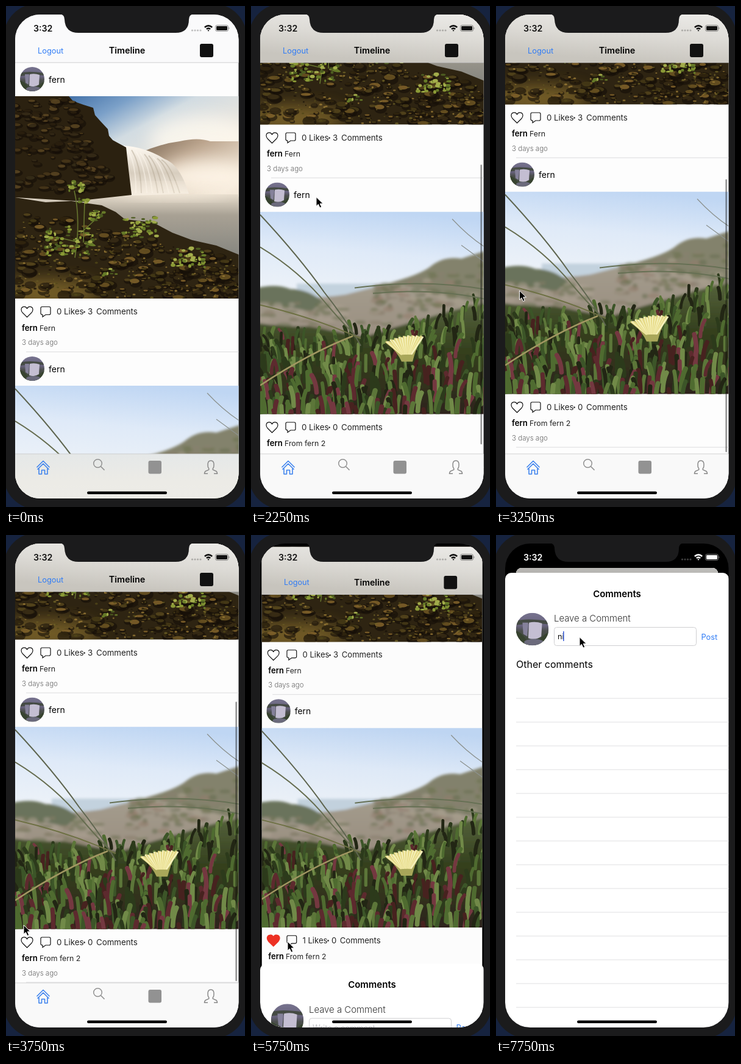
An HTML page for the animation above (8000 ms loop, 392x822 px).

```html
<!DOCTYPE html>
<html lang="en">
<head>
<meta charset="utf-8">
<title>Photo timeline</title>
<style>
  html, body { margin: 0; width: 100%; height: 100%; overflow: hidden; background: #16233f; }
  #stage { display: block; width: 392px; height: 822px; }
  text { font-family: Inter, Roboto, sans-serif; white-space: pre; }
</style>
</head>
<body>
<svg id="stage" viewBox="0 0 392 822"></svg>
<script>
const LOOP = 8000, STEP = 250, USER = 'fern';
const SCREEN = { x: 15, y: 14, w: 367, h: 794 };
const BLUE = '#2f7cf6';

let seed = 7;
const rand = (a = 0, b = 1) => {
  seed = (seed * 16807) % 2147483647;
  return a + (b - a) * seed / 2147483647;
};
const pick = list => list[Math.floor(rand(0, list.length))];
const repeat = (n, draw) => Array.from({ length: n }, (_, i) => draw(i)).join('');

// Markup helpers
const rect = (x, y, w, h, fill, more = '') =>
  `<rect x="${x}" y="${y}" width="${w}" height="${h}" fill="${fill}" ${more}/>`;
const shape = (d, fill, more = '') => `<path d="${d}" fill="${fill}" ${more}/>`;
const line = (d, stroke, width = 1, more = '') =>
  `<path d="${d}" fill="none" stroke="${stroke}" stroke-width="${width}" ${more}/>`;
const label = (x, y, str, size, more = '') => `<text x="${x}" y="${y}" font-size="${size}" ${more}>${str}</text>`;
const gradient = (id, stops, more = 'x2="0" y2="1"') =>
  `<linearGradient id="${id}" ${more}>${stops.map(([at, color]) =>
    `<stop offset="${at}" stop-color="${color}"/>`).join('')}</linearGradient>`;
const blur = (id, amount) =>
  `<filter id="${id}" x="-50%" y="-50%" width="200%" height="200%"><feGaussianBlur stdDeviation="${amount}"/></filter>`;
const blob = (x, y, rx, ry, fill, more = '') =>
  `<ellipse cx="${x.toFixed(1)}" cy="${y.toFixed(1)}" rx="${rx.toFixed(1)}" ry="${ry.toFixed(1)}" fill="${fill}" ${more}/>`;

const defs = `<defs>
  ${gradient('dusk', [[0, '#4674aa'], [.25, '#7ba0c8'], [.5, '#d2dce2'], [1, '#f3e9dc']], 'x1=".25" y1="0" x2=".55" y2=".5"')}
  ${gradient('hill', [[0, '#806d59'], [.45, '#bba48d'], [1, '#f0e4d4']], 'x2="1" y2=".7"')}
  ${gradient('fall', [[0, '#fffaf2'], [.55, '#d8cebf'], [1, '#f6eee2']])}
  ${gradient('lake', [[0, '#e6dccc'], [.2, '#a8a194'], [.6, '#85857f'], [1, '#60625e']])}
  ${gradient('day', [[0, '#bfd6f3'], [.4, '#dfeaf8'], [1, '#f2f5f8']], 'x1=".6" y1="0" x2=".4" y2="1"')}
  ${gradient('sand', [[0, '#a9a494'], [1, '#95877a']])}
  ${gradient('leaves', [[0, '#56633c'], [.4, '#35411f'], [1, '#2c211b']])}
  ${gradient('headTint', [[0, '#ecebe8'], [.5, '#dddbd6'], [1, '#c8c5be']], 'x1="1" y1="0" x2=".7" y2="1"')}
  ${gradient('tabTint', [[0, '#e5e8e8'], [.4, '#ecebe6'], [1, '#edece8']])}
  ${gradient('face', [[0, '#77738f'], [.4, '#66617b'], [.55, '#4b4e4c'], [1, '#354330']])}
  ${blur('mist', 14)}${blur('soft', 2)}
  <clipPath id="screenClip"><rect x="15" y="14" width="366.5" height="794" rx="41"/></clipPath>
  <clipPath id="cardClip"><rect id="cardShape" x="15" y="14" width="367" height="830"/></clipPath>
  <clipPath id="round"><circle r="20"/></clipPath>
  <g id="avatar"><g clip-path="url(#round)">
    ${rect(-20, -20, 40, 40, 'url(#face)')}
    ${shape('M-20-10 Q-8-14 20-10 L20-6 Q4-8-20-5Z', '#454b44')}
    ${shape('M-4-8 Q4-10 12-7 L11 9 Q4 14-5 11Z', '#c4bed2')}
    ${shape('M-12-8 L-5-8-6 9-11 6Z', '#85819a')}
    ${shape('M-20 2 Q-8 6-6 20 H-20Z M20 4 Q10 8 6 20 H20Z', '#37432f')}
    ${blob(2, 16, 12, 4, '#6b6a7c')}
  </g></g>
  <path id="heart" d="M0 9 L-7.3 1.8 Q-9.5-.6-9.5-3.5 A4.9 4.9 0 0 1 0-4.9 A4.9 4.9 0 0 1 9.5-3.5 Q9.5-.6 7.3 1.8Z" stroke-linejoin="round"/>
</defs>`;

const photoSvg = (y, content) =>
  `<svg x="15" y="${y}" width="367" height="332" viewBox="0 0 367 332" overflow="hidden">${content}</svg>`;

function waterfallPhoto(y) {
  const cliff = 'M0 0 H88 L95 8 112 14 128 19 131 31 139 40 152 54 154 65 160 72 182 84 186 120 191 162 100 172 0 166Z';
  const shore = 'M0 166 L50 174 92 172 142 179 165 190 180 202 226 207 258 224 290 236 330 245 367 260 V332 H0Z';
  const rock = (x, yy, tops, size) => {
    const rx = rand(3, 11) * size, ry = rx * rand(.45, .75);
    return blob(x, yy, rx, ry, '#140e07', 'opacity=".6"') +
      blob(x - rx * .15, yy - ry * .4, rx * .75, ry * .5, pick(tops), 'opacity=".8"');
  };
  const plant = (cx, cy, spread, n) => repeat(n, () =>
    blob(cx + rand(-spread, spread), cy + rand(-spread, spread) * .6, rand(1.5, 4.5), rand(1, 3), pick(['#8b9a36', '#667a28', '#a3ad4b', '#4c5b20'])));
  return photoSvg(y, `
    ${rect(0, 0, 367, 332, 'url(#dusk)')}
    ${blob(305, 72, 85, 40, '#fffaf0', 'opacity=".75" filter="url(#mist)"')}
    ${shape('M205 93 Q238 78 270 74 Q300 67 320 74 L367 74 V165 H210Z', 'url(#hill)')}
    ${blob(310, 132, 75, 28, '#fff6e8', 'opacity=".9" filter="url(#mist)"')}
    ${rect(0, 161, 367, 171, 'url(#lake)')}
    ${shape('M178 81 Q215 84 245 103 Q270 112 285 160 L190 163Z', 'url(#fall)')}
    ${repeat(9, i => line(`M${184 + i * 7} ${86 + i * 2.3} Q${199 + i * 7} 112 ${198 + i * 9} 159`, pick(['#fffaf0', '#b6a995']), 2, 'opacity=".5"'))}
    ${blob(265, 157, 90, 9, '#f9efe0', 'opacity=".8" filter="url(#mist)"')}
    ${shape(cliff, '#2b2110')}
    ${repeat(150, () => { const yy = rand(5, 157); return rock(rand(0, 90 + yy * .52), yy, ['#4e3b1b', '#2c2110', '#604a24', '#3a2f19'], 1); })}
    ${shape(shore, '#2e2412')}
    ${blob(50, 322, 90, 22, '#8a702e', 'opacity=".8" filter="url(#mist)"')}
    ${repeat(230, () => { const x = rand(0, 367), top = 186 + x * .22;
      return rock(x, rand(top, 332), ['#5a4a1e', '#3a2d16', '#745a25', '#4a3e18', '#33270f', '#8a6a2e'], 1.15); })}
    ${repeat(260, () => { const x = rand(0, 367);
      return blob(x, rand(195 + x * .2, 332), rand(1, 3), rand(.6, 1.8), pick(['#9a7b36', '#6e6226', '#1a1209', '#504718']), 'opacity=".8"'); })}
    ${line('M98 265 Q108 205 97 155 M112 240 L114 172 M105 240 L72 232 M107 225 L145 190', '#66752f', 1.6)}
    ${plant(100, 148, 13, 26)}${plant(113, 170, 8, 10)}${plant(88, 238, 40, 75)}${plant(137, 195, 14, 20)}
    ${plant(205, 215, 27, 55)}${plant(285, 265, 27, 40)}${plant(155, 290, 12, 8)}`);
}

function dunePhoto(y) {
  const COUNT = 420;
  const leaf = i => {
    const depth = i / COUNT, x = rand(-5, 372);
    const far = 205 - Math.max(0, x - 190) * .3;
    const base = far + depth * (355 - far) + rand(-6, 6);
    const h = rand(12, 24) + depth * 14, lean = rand(-7, 7) + (x - 180) * .015;
    const red = rand() < .12 + depth * .3 - x * .0004;
    const color = red ? pick(['#5d2a2e', '#743840', '#47221f'])
      : pick(['#4f6b30', '#3c5528', '#718a48', '#5c7639', '#2c3a1b', '#222614']);
    return line(`M${x.toFixed(1)} ${base.toFixed(1)} q${(lean * .1).toFixed(1)} ${(-h * .6).toFixed(1)} ${lean.toFixed(1)} ${(-h).toFixed(1)}`,
      color, (rand(3.5, 6) + depth * 3).toFixed(1), 'stroke-linecap="round"');
  };
  return photoSvg(y, `
    ${rect(0, 0, 367, 170, 'url(#day)')}
    <g filter="url(#soft)">
      ${rect(60, 118, 190, 30, '#c3d2de')}
      ${shape('M-9 139 Q80 145 140 136 L225 114 Q300 97 376 75 V250 H-9Z', 'url(#sand)')}
      ${shape('M-9 126 Q25 117 50 127 Q80 127 103 148 L83 164 Q35 151-9 154Z', '#6b735c')}
      ${shape('M212 117 Q260 104 278 91 Q300 72 330 77 L376 62 V156 Q300 132 212 117Z', '#83826c')}
      ${repeat(100, () => { const x = rand(190, 372); return blob(x, rand(168 - x * .24, 172), rand(4, 11), rand(2, 5), pick(['#6c714f', '#a89f8c', '#8b8070', '#676e50', '#937d6c']), 'opacity=".6"'); })}
      ${repeat(45, () => blob(rand(0, 210), rand(148, 190), rand(5, 14), rand(2, 5), pick(['#6a7150', '#aba191', '#877c68']), 'opacity=".55"'))}
      ${shape('M-9 182 Q45 190 80 188 Q130 197 170 206 Q210 192 275 174 Q330 157 376 148 V342 H-9Z', 'url(#leaves)')}
    </g>
    ${repeat(COUNT, leaf)}
    ${line('M0 5 Q65 75 105 132 Q143 180 165 220', '#5e654f', 2)}
    ${line('M0 58 Q66 98 110 153 Q133 180 152 199', '#666d50', 2)}
    ${line('M0 153 Q90 174 165 208', '#6d7043', 2)}
    ${line('M0 285 Q80 232 152 204', '#a29762', 2.5)}
    ${line('M155 125 Q265 110 367 127 M185 134 Q285 125 367 143', '#667054', 2)}
    ${line('M315 12 Q340 39 367 57 M330 55 L367 82', '#8d9390', 1.3)}
    ${shape('M207 214 Q225 230 232 246 L250 246 Q255 225 266 205Z', '#a9a75a')}
    ${repeat(26, i => { const k = i / 25;
      return line(`M${(232 + 16 * k).toFixed(1)} 234 L${(206 + 61 * k).toFixed(1)} ${(213 - 9 * k - 5 * Math.sin(Math.PI * k) + i % 3).toFixed(1)}`, i % 2 ? '#f6f1bb' : '#e6da86', 3); })}`);
}

function post(top, photo, caption, id) {
  return `<use href="#avatar" x="43" y="${top + 27}"/>
    ${label(70, top + 32.5, USER, 14)}
    ${photo(top + 55)}
    <g transform="translate(34.5 ${top + 408.5})"><use id="heart${id}" href="#heart" fill="#fff" stroke="#111" stroke-width="1.2"/></g>
    ${line(`M59 ${top + 400.5} H71 Q73 ${top + 400.5} 73 ${top + 403} V${top + 411} Q73 ${top + 413.5} 71 ${top + 413.5} H65 L60 ${top + 417} V${top + 413.5} Q57 ${top + 413.5} 57 ${top + 411} V${top + 403} Q57 ${top + 400.5} 59 ${top + 400.5}Z`, '#111', 1.2)}
    <g font-size="13.3" fill="#222">
      <text id="likes${id}" x="83" y="${top + 413}">0</text>
      <g id="counts${id}"><text x="95" y="${top + 413}">Likes</text>
        <circle cx="128.5" cy="${top + 409}" r="1.3"/>
        <text x="134" y="${top + 413}">${id === 1 ? 3 : 0}</text>
        <text x="148" y="${top + 413}">Comments</text></g>
    </g>
    ${label(26, top + 439.5, USER, 13.1, 'font-weight="600"')}
    ${label(55, top + 439.5, caption, 12.3, 'fill="#222"')}
    ${label(26, top + 463, '3 days ago', 11.5, 'fill="#666" font-weight="300"')}
    ${rect(33, top + 474, 349, 1, '#dcdcde')}`;
}

const header = `${rect(15, 14, 367, 79, '#fafafb')}
  <g id="headTintLayer">${rect(15, 14, 367, 79, 'url(#headTint)')}</g>
  ${rect(15, 92.5, 367, .8, '#c4c4c6')}
  ${label(52, 77.5, 'Logout', 12.8, `fill="${BLUE}"`)}
  ${label(198.5, 78, 'Timeline', 14.4, 'font-weight="600" text-anchor="middle"')}
  ${rect(318, 62, 22, 22, '#111', 'rx="3"')}`;

const tabs = `${rect(15, 735, 367, 110, '#f9f9f9')}
  <g id="tabTintLayer">${rect(15, 735, 367, 110, 'url(#tabTint)')}</g>
  ${rect(15, 734.5, 367, .8, '#c7c7c8')}
  ${line('M50.5 757 L61 746.5 71.5 757 M51.5 760.5 L61 751 70.5 760.5 M54 759 V768 H58.5 V761.5 H63.5 V768 H68 V759', '#3e83ee', 1.6, 'stroke-linejoin="round"')}
  <circle cx="150.5" cy="750.5" r="6.8" fill="none" stroke="#929292" stroke-width="1.5"/>
  ${line('M155.5 755.5 L161.5 761.5', '#929292', 1.7)}
  ${rect(233.5, 746, 21.5, 21.5, '#929292', 'rx="3"')}
  ${line('M331 767.3 H325.5 Q325.5 763.5 329 762.5 L332.5 761 Q333.5 759.5 331.5 757 Q329.5 746 336 746 Q342.5 746 340.5 757 Q338.5 759.5 339.5 761 L343 762.5 Q346.5 763.5 346.5 767.3 H341', '#8a8a8a', 1.5)}`;

const sheet = `${rect(15, 62, 367, 790, '#fff', 'rx="10"')}
  ${label(198.5, 101.5, 'Comments', 15, 'font-weight="600" text-anchor="middle"')}
  <use href="#avatar" transform="translate(59.5 154.5) scale(1.34)"/>
  ${label(95, 142, 'Leave a Comment', 14.9, 'font-weight="300" fill="#333"')}
  ${rect(95.5, 151.5, 233, 30, '#fff', 'rx="4" stroke="#cfcfd1"')}
  <text id="field" x="101" y="171" font-size="12.8"></text>
  <rect id="caret" y="158" width="1.6" height="16" fill="#3f62d8"/>
  ${label(336.5, 171.5, 'Post', 12.8, `fill="${BLUE}"`)}
  ${label(33, 217.5, 'Other comments', 16)}
  ${repeat(14, i => rect(33, 267.5 + i * 39, 349, 1, '#dfdfe1'))}`;

const statusBar = `<g id="status">
  ${label(45, 41.5, '3:32', 14.2, 'font-weight="600"')}
  ${repeat(4, i => `<circle cx="${305.5 + i * 4.5}" cy="40" r="1.6" opacity=".25"/>`)}
  <path d="M325 34 Q332 28 339 34 L337.3 36 Q332 31.6 326.7 36Z M328 37 Q332 33.7 336 37 L334.4 38.8 Q332 37 329.6 38.8Z M330.4 39.8 Q332 38.5 333.6 39.8 L332 41.7Z"/>
  <rect x="343.5" y="31.5" width="21" height="10" rx="2.8" fill="none" stroke="currentColor" stroke-opacity=".45"/>
  <rect x="345" y="33" width="18" height="7" rx="1.4"/>
  <path d="M365.5 34.5 Q367.5 36.5 365.5 38.5Z" opacity=".5"/>
</g>`;

const stage = document.getElementById('stage');
stage.innerHTML = `${defs}
  ${rect(0, 0, 392, 822, '#16233f')}
  ${rect(-4, -4, 399, 830, '#1b1b1c', 'rx="56"')}
  <g clip-path="url(#screenClip)">
    ${rect(SCREEN.x, SCREEN.y, SCREEN.w, SCREEN.h, '#000')}
    <g id="card"><g clip-path="url(#cardClip)">
      ${rect(15, 14, 367, 830, '#fdfdfd')}
      <g id="feed">${post(93, waterfallPhoto, 'Fern', 1)}${post(568, dunePhoto, `From ${USER} 2`, 2)}</g>
      <rect id="scrollbar" x="376.3" width="2.7" rx="1.3" fill="#000" opacity=".4"/>
      ${header}${tabs}
      <rect id="dim" x="15" y="14" width="367" height="830"/>
    </g></g>
    <g id="sheet">${sheet}</g>
    ${statusBar}
    ${rect(133, 796.5, 131, 4.5, '#000', 'rx="2.2"')}
  </g>
  ${shape('M88 13 Q96 14 96 22 Q97 44 119 44 H278 Q300 44 300 22 Q300 14 308 13Z', '#1b1b1c')}
  <path id="cursor" d="M0 0 V15 L3.4 11.8 6 17.6 8.7 16.4 6.2 10.8 H11Z" fill="#000" stroke="#fff" stroke-width="1"/>`;

const el = Object.fromEntries([...stage.querySelectorAll('[id]')].map(node => [node.id, node]));
const set = (node, attrs) => { for (const key in attrs) node.setAttribute(key, attrs[key]); };
const clamp = v => Math.max(0, Math.min(1, v));

// Linear track of [time, value, ...] keys
function track(keys, t) {
  const next = keys.findIndex(key => key[0] > t);
  if (next === 0) return keys[0].slice(1);
  if (next < 0) return keys[keys.length - 1].slice(1);
  const a = keys[next - 1], b = keys[next], k = (t - a[0]) / (b[0] - a[0]);
  return a.slice(1).map((v, i) => v + (b[i + 1] - v) * k);
}

const scrollKeys = [[1750, 0], [2000, 125], [2250, 285.5], [2500, 334], [2750, 343], [3000, 331], [3250, 318.5], [3500, 311], [3750, 308.5], [4000, 308]];
const sheetKeys = [[5500, 0], [5750, .14], [6000, .86], [6250, 1]];
const cursorKeys = [[500, 33, 503], [1500, 71, 540], [1750, 104, 599.5], [2000, 105, 470], [2250, 107, 313.5],
  [2500, 106, 300], [2750, 88, 320], [3250, 38.5, 467], [3750, 29, 640], [4000, 30, 668.5], [4750, 30, 668.5],
  [5250, 60, 667], [5750, 60, 667], [6000, 100, 420], [6250, 147, 184], [6500, 147, 184], [6750, 137, 167.5]];

function render(t) {
  const [offset] = track(scrollKeys, t), [rise] = track(sheetKeys, t), [cx, cy] = track(cursorKeys, t);
  const liked = t >= 4250, typed = 'ni'.slice(0, Math.max(0, (t - 7250) / STEP));
  const focused = t >= 7250;

  set(el.feed, { transform: `translate(0 ${-offset})` });
  const barTop = 99 + offset * .565 + Math.max(0, offset - 308) * .5;
  set(el.scrollbar, { y: barTop, height: Math.min(732, barTop + 459) - barTop, visibility: offset && t < 5000 ? 'visible' : 'hidden' });
  set(el.headTintLayer, { opacity: clamp(offset / 150) });
  set(el.tabTintLayer, { opacity: clamp((285 - offset) / 120) });

  set(el.heart2, { fill: liked ? '#ee3124' : '#fff', stroke: liked ? '#ee3124' : '#111', transform: `scale(${liked ? 1.1 : 1})` });
  el.likes2.textContent = liked ? 1 : 0;
  set(el.counts2, { transform: `translate(${liked ? -3 : 0} 0)` });

  set(el.card, { transform: `translate(198.5 ${14 + 40 * rise}) scale(${1 - .098 * rise}) translate(-198.5 -14)` });
  set(el.cardShape, { rx: 10 * clamp(rise * 8) });
  set(el.dim, { opacity: .2 * rise * rise });
  set(el.sheet, { transform: `translate(0 ${746 * (1 - rise)})`, visibility: rise ? 'visible' : 'hidden' });
  const ink = rise > .5 ? '#fff' : '#111';
  set(el.status, { fill: ink, color: ink });

  el.field.textContent = typed || 'Write a comment';
  set(el.field, { fill: typed ? '#111' : '#c2c2c6' });
  set(el.caret, { x: [101, 107.5, 110][typed.length], visibility: focused ? 'inherit' : 'hidden' });
  set(el.cursor, { transform: `translate(${cx} ${cy})`, visibility: t >= 500 ? 'visible' : 'hidden' });
}

const start = performance.now();
function tick() {
  const elapsed = (performance.now() - start) % LOOP;
  render(Math.floor(elapsed / STEP) * STEP);
  requestAnimationFrame(tick);
}
tick();
</script>
</body>
</html>
```
